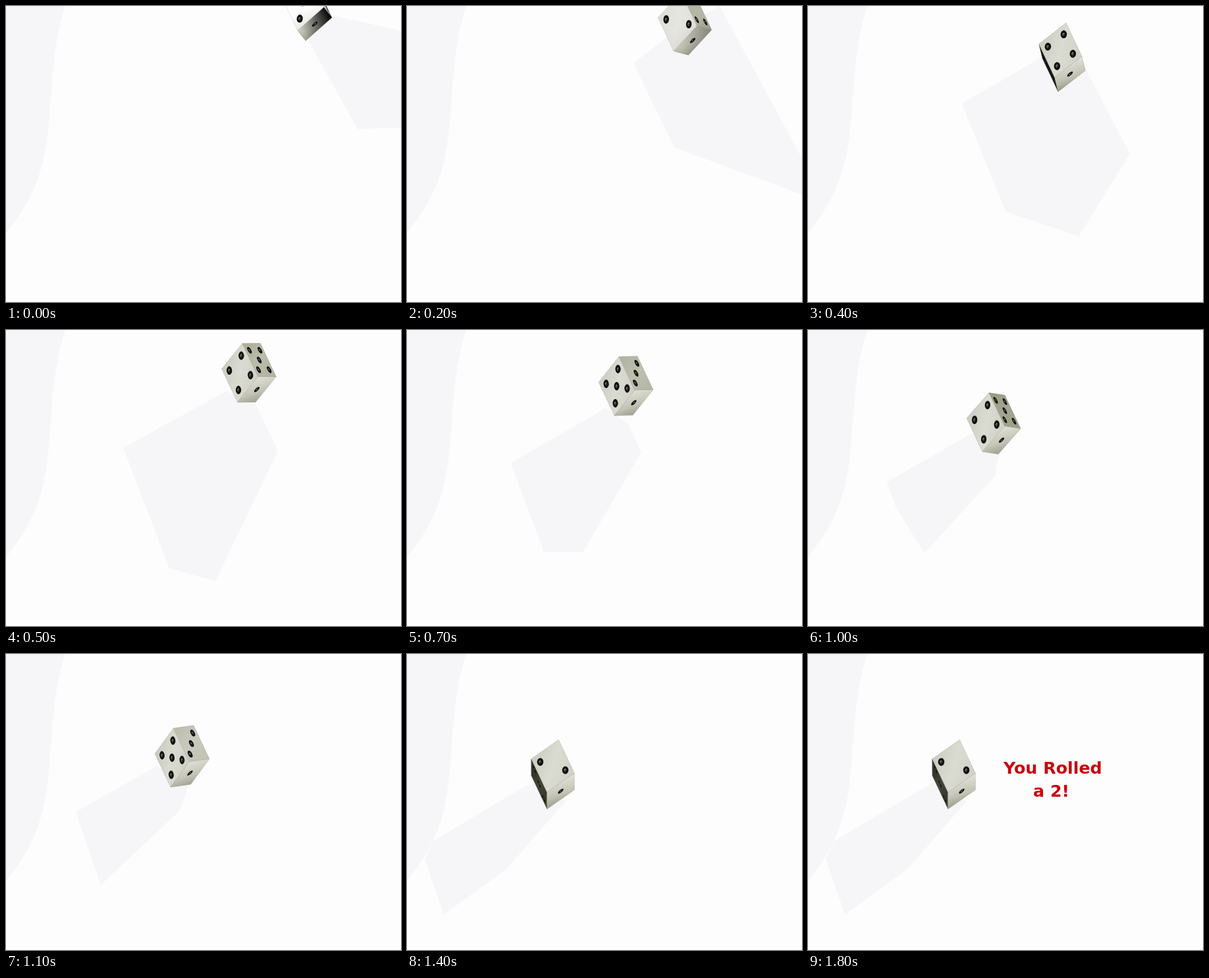
Recreate the animation shown at these times as an HTML page with a canvas. Size 600 by 450 pixels, loop 1900 ms.

```html
<!DOCTYPE html>
<html lang="en">
<head>
<meta charset="utf-8">
<title>Dice roll</title>
<style>
  html, body { margin: 0; width: 100%; height: 100%; overflow: hidden; background: #fefdfe; }
  canvas, svg { position: absolute; left: 0; top: 0; width: 600px; height: 450px; }
  text { font: bold 25.3px "DejaVu Sans", Verdana, sans-serif; fill: #c8060c; }
</style>
</head>
<body>
<canvas id="stage" width="600" height="450"></canvas>
<svg viewBox="0 0 600 450" id="result">
  <text x="297" y="182">You Rolled</text>
  <text x="342" y="217">a 2!</text>
</svg>
<script>
const ctx = document.getElementById('stage').getContext('2d');
const result = document.getElementById('result');
const LOOP = 1900, STEP = 100, LAST_STEP = 14, TEXT_AT = 1800;

// [step, centre x, centre y, spin in degrees]
const poses = [
  [0, 457, 2, 85], [2, 422, 27, -20], [4, 386, 78, -85], [5, 369, 65, -119],
  [6, 354, 55, -150], [8, 311, 115, -270], [11, 267.5, 155.5, -575],
  [12, 257, 160, -650], [14, 221.5, 183, -708]
];

// [step, six outline points]
const shadows = [
  [0, 459, 52, 490, 108, 534, 187, 640, 184, 700, 60, 495, 14],
  [2, 391, 50, 344, 87, 406, 215, 598, 286, 640, 306, 475, 0],
  [5, 335, 93, 178, 179, 248, 362, 318, 382, 413, 184, 378, 110],
  [8, 285, 132, 147, 214, 188, 325, 242, 316, 327, 187, 316, 160],
  [11, 230, 170, 106, 240, 106, 241, 144, 351, 264, 238, 277, 200],
  [14, 190, 195, 40, 284, 27, 312, 56, 396, 150, 328, 241, 224]
];

// Pip layouts of the four faces around the spin axis; face 1 closes its near end
const A = 0.21, B = 0.5, C = 0.79;
const corners = [[A, A], [C, A], [A, C], [C, C]];
const sides = [
  [[A, A], [C, C]],
  corners,
  [...corners, [B, B]],
  [[C, A], [B, B], [A, C]]
];
const AXIS = [-24, -51];

function sample(keys, step) {
  const i = Math.max(1, keys.findIndex(k => k[0] >= step));
  const from = keys[i - 1], to = keys[i];
  const p = (step - from[0]) / (to[0] - from[0]);
  return from.slice(1).map((v, j) => v + (to[j + 1] - v) * p);
}

// Screen vector of a cube edge turned around the axis
function edge(deg) {
  const a = deg * Math.PI / 180, c = Math.cos(a), s = Math.sin(a);
  return [40.8 * c + 8.8 * s, -34 * c + 18.7 * s];
}

const sum = (...terms) => [0, 1].map(i => terms.reduce((t, [k, v]) => t + k * v[i], 0));

function gradient(x0, y0, x1, y1, ...stops) {
  const g = ctx.createLinearGradient(x0, y0, x1, y1);
  stops.forEach((color, i) => g.addColorStop(i / (stops.length - 1), color));
  return g;
}

function polygon(points, fill, stroke) {
  ctx.beginPath();
  points.forEach(([x, y]) => ctx.lineTo(x, y));
  ctx.closePath();
  ctx.fillStyle = fill;
  ctx.fill();
  if (stroke) {
    ctx.strokeStyle = stroke;
    ctx.lineWidth = 0.7;
    ctx.stroke();
  }
}

function dot(x, y, r, color) {
  ctx.beginPath();
  ctx.arc(x, y, r, 0, 2 * Math.PI);
  ctx.fillStyle = color;
  ctx.fill();
}

function face(origin, u, v, pips, fills) {
  const quad = [[0, 0], [1, 0], [1, 1], [0, 1]]
    .map(([a, b]) => sum([1, origin], [a, u], [b, v]));
  fills.forEach(fill => polygon(quad, fill, fill === fills[0] && 'rgba(110,110,95,.3)'));
  ctx.save();
  ctx.transform(...u, ...v, ...origin);
  for (const [x, y] of pips) {
    dot(x, y, 0.1, '#10100e');
    dot(x - 0.005, y - 0.005, 0.035, '#85857b');
    dot(x, y + 0.01, 0.02, '#22221e');
  }
  ctx.restore();
}

function drawDie(step) {
  const [x, y, spin] = sample(poses, step);
  const centre = [x, y], down = AXIS.map(v => -v);
  const early = Math.max(0, 1 - step / 3);
  const dark = gradient(x - 5, y + 40, x + 38, y + 16, 'rgba(0,0,0,0)', `rgba(0,0,0,${early})`);
  const glare = gradient(x - 8, y + 6, x + 10, y + 42,
    `rgba(254,253,254,${early})`, 'rgba(254,253,254,0)');

  sides.forEach((pips, i) => {
    const turn = spin + 90 * i;
    const angle = ((turn + 180) % 360 + 360) % 360 - 180;
    if (Math.abs(angle) >= 90) return;
    const u = edge(turn), depth = edge(turn + 90);
    const origin = sum([1, centre], [-0.5, depth], [-0.5, u], [0.5, AXIS]);
    const light = 81 - 140 * (Math.abs(angle) / 90) ** 6;
    const tone = shift => `hsl(65 11% ${Math.max(8, light + shift)}%)`;
    const end = sum([1, origin], [1, u], [1, down]);
    face(origin, u, down, pips,
      [gradient(...origin, ...end, tone(-3), tone(3), tone(-1)), early ? glare : 'transparent']);
  });

  const u = edge(spin), v = edge(spin + 90);
  const origin = sum([1, centre], [-0.5, AXIS], [-0.5, u], [-0.5, v]);
  const base = gradient(x + 5, y + 10, x + 19, y + 50, '#dfdfd5', '#c3c3b5', '#8b8a7b');
  face(origin, u, v, [[B, B]], [base, early ? dark : 'transparent']);
}

function drawBackdrop() {
  ctx.fillStyle = '#fefdfe';
  ctx.fillRect(0, 0, 600, 450);
  ctx.beginPath();
  ctx.moveTo(0, 0);
  ctx.lineTo(90, 0);
  ctx.bezierCurveTo(73, 50, 71, 105, 66, 165);
  ctx.bezierCurveTo(61, 230, 52, 282, 0, 345);
  ctx.fillStyle = '#f6f5f8';
  ctx.fill();
}

function drawShadow(step) {
  const flat = sample(shadows, step);
  const points = [];
  for (let i = 0; i < flat.length; i += 2) points.push([flat[i], flat[i + 1]]);
  polygon(points, '#f6f5f8');
}

const start = performance.now();
function frame() {
  const t = (performance.now() - start) % LOOP;
  const step = Math.min(LAST_STEP, Math.floor(t / STEP));
  drawBackdrop();
  drawShadow(step);
  drawDie(step);
  result.style.visibility = t >= TEXT_AT ? 'visible' : 'hidden';
  requestAnimationFrame(frame);
}
frame();
</script>
</body>
</html>
```
